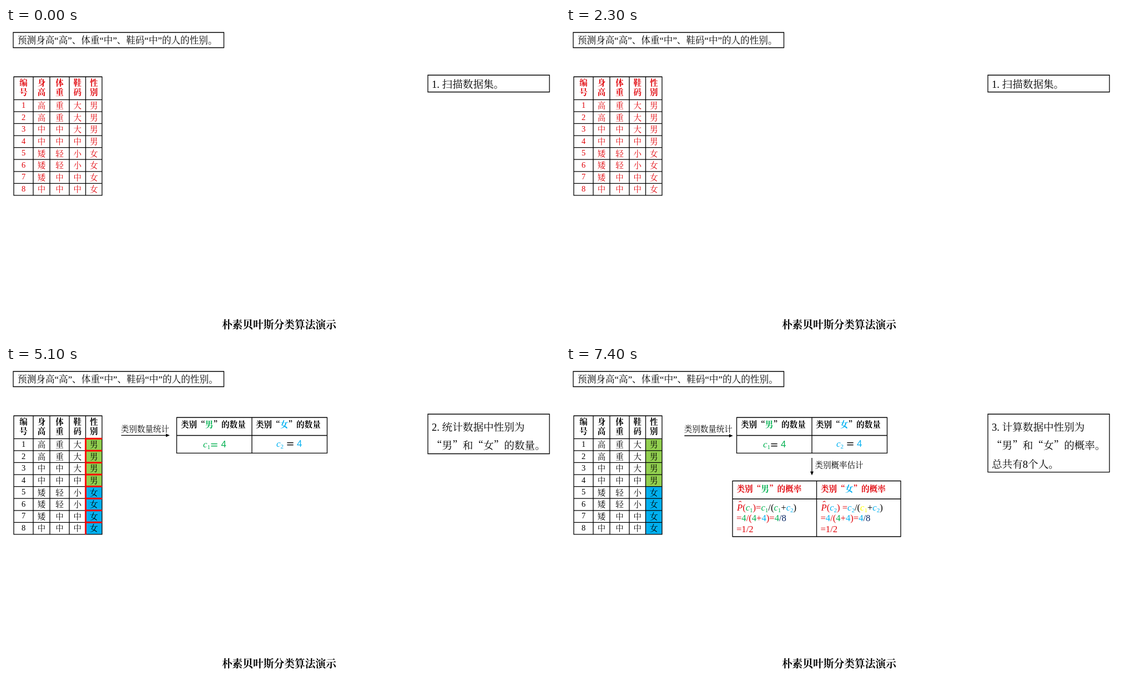
Recreate the animation shown at these times as an HTML page. Size 998 by 561 pixels, loop 8000 ms.

```html
<!DOCTYPE html>
<html lang="zh-CN">
<head>
<meta charset="utf-8">
<title>朴素贝叶斯分类算法演示</title>
<style>
html, body { margin: 0; width: 100%; height: 100%; overflow: hidden; background: #fff; }
svg { display: block; width: 998px; height: 561px; }
text { font-family: 'Liberation Serif', 'Noto Serif CJK SC', 'Noto Sans CJK SC', 'Noto Sans CJK', serif; }
.wide { font-family: 'Noto Serif CJK SC', 'Noto Sans CJK SC', 'Noto Sans CJK', serif; }
.bold { font-weight: 700; }
.mid { text-anchor: middle; }
.math { font-family: 'DejaVu Sans', sans-serif; font-size: 18px; }
.num { font-family: 'Noto Sans', sans-serif; font-size: 16px; }
.it { font-style: italic; }
.line { fill: none; stroke: #000; stroke-width: 1.3; }
.mark { fill: none; stroke: #f00; stroke-width: 3; }
.red { fill: #e00208; }
.green { fill: #00b050; }
.blue { fill: #00b0f0; }
.yellow { fill: #ff0; }
.navy { fill: #002060; }
.scene { visibility: hidden; animation: 8s step-end infinite; }
#scan { animation-name: scan; }
#count { animation-name: count; }
#prob { animation-name: prob; }
@keyframes scan { 0% { visibility: visible } 33.75%, 100% { visibility: hidden } }
@keyframes count { 0% { visibility: hidden } 33.75% { visibility: visible } 66.25%, 100% { visibility: hidden } }
@keyframes prob { 0% { visibility: hidden } 66.25%, 100% { visibility: visible } }
</style>
</head>
<body>
<svg viewBox="0 0 998 561">
  <g id="frame"></g>
  <g id="scan" class="scene"></g>
  <g id="count" class="scene"></g>
  <g id="prob" class="scene"></g>
</svg>
<script>
const text = (x, y, size, body, cls = '') =>
  `<text x="${x}" y="${y}" font-size="${size}" class="${cls}">${body}</text>`;
const ink = (cls, body) => `<tspan class="${cls}">${body}</tspan>`;
const path = (d, cls = 'line') => `<path class="${cls}" d="${d}"/>`;
const box = (x, y, w, h) => path(`M${x} ${y}h${w}v${h}h${-w}z`);
const sub = (n, cls) => ink(cls, ink('it', 'c') + `<tspan font-size="11" baseline-shift="-3">${n}</tspan>`);

// Ruled grid through the given column and row lines
function grid(xs, ys) {
  const [x0, x1, y0, y1] = [xs[0], xs.at(-1), ys[0], ys.at(-1)];
  return path(xs.map(x => `M${x} ${y0 - .6}V${y1 + .6}`).join('') +
              ys.map(y => `M${x0} ${y}H${x1}`).join(''));
}

// Data table
const cols = [14, 49, 79, 114, 143.5, 173];
const rowY = i => 129.3 + i * 21.58;
const heads = ['编号', '身高', '体重', '鞋码', '性别'];
const people = ['高重大男', '高重大男', '中中大男', '中中中男', '矮轻小女', '矮轻小女', '矮中中女', '中中中女'];
const centre = i => (cols[i] + cols[i + 1]) / 2;

function dataTable(cls, filled, marked) {
  let out = '';
  if (filled)
    out += `<path fill="#92d050" d="M143.5 129.3H173V${rowY(4)}H143.5z"/>` +
           `<path fill="#00b0f0" d="M143.5 ${rowY(4)}H173V${rowY(8)}H143.5z"/>`;
  out += grid(cols, [88, ...Array.from({ length: 9 }, (_, i) => rowY(i))]);
  if (marked)
    out += path(`M143.5 128V${rowY(8)}` + people.map((_, i) => `M142 ${rowY(i)}H173`).join(''), 'mark');
  heads.forEach((h, i) => [...h].forEach((ch, k) =>
    out += text(centre(i), 104 + k * 17, 14.5, ch, `mid bold ${cls}`)));
  people.forEach((p, r) => [r + 1, ...p].forEach((ch, i) =>
    out += text(centre(i), rowY(r) + (i ? 15.9 : 14.7), 14.5, ch, `mid ${cls}`)));
  return out;
}

const question = size => text(21, 27.5, size, '预测身高“高”、体重“中”、鞋码“中”的人的性别。');

function steps(h, y, lines) {
  return box(760, 85, 219, h) +
    lines.map((s, i) => text(767, y + i * 33.4, 18.6, s, s[0] === '“' ? 'wide' : '')).join('');
}

const head = (x, y, sex, cls, what) =>
  text(x, y, 14.6, `类别“${ink(cls, sex)}”的${what}`, 'wide bold' + (what === '概率' ? ' red' : ''));

function countArrow(x, y) {
  return text(x, 117, 14.5, '类别数量统计') + path(`M${x + .5} ${y}h83`) +
    `<path d="M${x + 88} ${y}l-7 -3v6z"/>`;
}

function countTable(eqCls, x4) {
  return grid([307.5, 443, 578.5], [91, 123.5, 155.3]) +
    head(315, 109, '男', 'green', '数量') + head(450, 109, '女', 'blue', '数量') +
    text(355, 145, 17, sub(1, 'green')) +
    text(367.5, 146, 18, '=', `math ${eqCls}`) + text(x4, 145, 16, 4, 'num green') +
    text(487, 144, 17, sub(2, 'blue')) +
    text(504.5, 144, 18, '=', 'math') + text(524, 143.5, 16, 4, 'num blue');
}

// One estimate: the class share, its numbers and the result
function estimate(x, n, cls, first, gap) {
  const red = s => ink('red', s);
  return text(x + 4, 253, 16, 'ˆ', 'red') +
    text(x + 1, 259, 16.6, red(ink('it', 'P') + '(') + sub(n, cls) + red(`)${gap}=`) + sub(n, cls) +
      '/(' + sub(1, first) + '+' + sub(2, 'blue') + ')') +
    text(x, 278, 16.6, red('=') + ink(cls, 4) + red('/(') + ink('green', 4) + red('+') +
      ink('blue', 4) + red(')=') + ink(cls, 4) + ink('navy', '/8')) +
    text(x, 298, 16.6, '=1/2', 'red');
}

const put = (id, ...parts) => document.getElementById(id).innerHTML = parts.join('');

put('frame',
  box(13, 8, 379.5, 27.5),
  text(492, 541.5, 18.75, '朴素贝叶斯分类算法演示', 'mid bold'));

put('scan',
  question(16.6),
  dataTable('red'),
  steps(30.5, 107.5, ['1. 扫描数据集。']));

put('count',
  question(16.67),
  dataTable('', true, true),
  countArrow(207, 123.3),
  countTable('green', 387.5),
  steps(71.5, 114.8, ['2. 统计数据中性别为', '“男”和“女”的数量。']));

put('prob',
  question(16.67),
  dataTable('', true),
  countArrow(212.8, 124),
  countTable('', 387),
  path('M443 164V189'), '<path d="M443 195.5l-3 -7h6z"/>',
  text(448.5, 182, 14.5, '类别概率估计'),
  grid([300, 451.5, 603], [205.5, 238, 306]),
  head(307.5, 224.5, '男', 'green', '概率'), head(459, 224.5, '女', 'blue', '概率'),
  estimate(307, 1, 'green', 'green', ''), estimate(458.5, 2, 'blue', 'yellow', ' '),
  steps(104.7, 114.8, ['3. 计算数据中性别为', '“男”和“女”的概率。', '总共有8个人。']));
</script>
</body>
</html>
```
